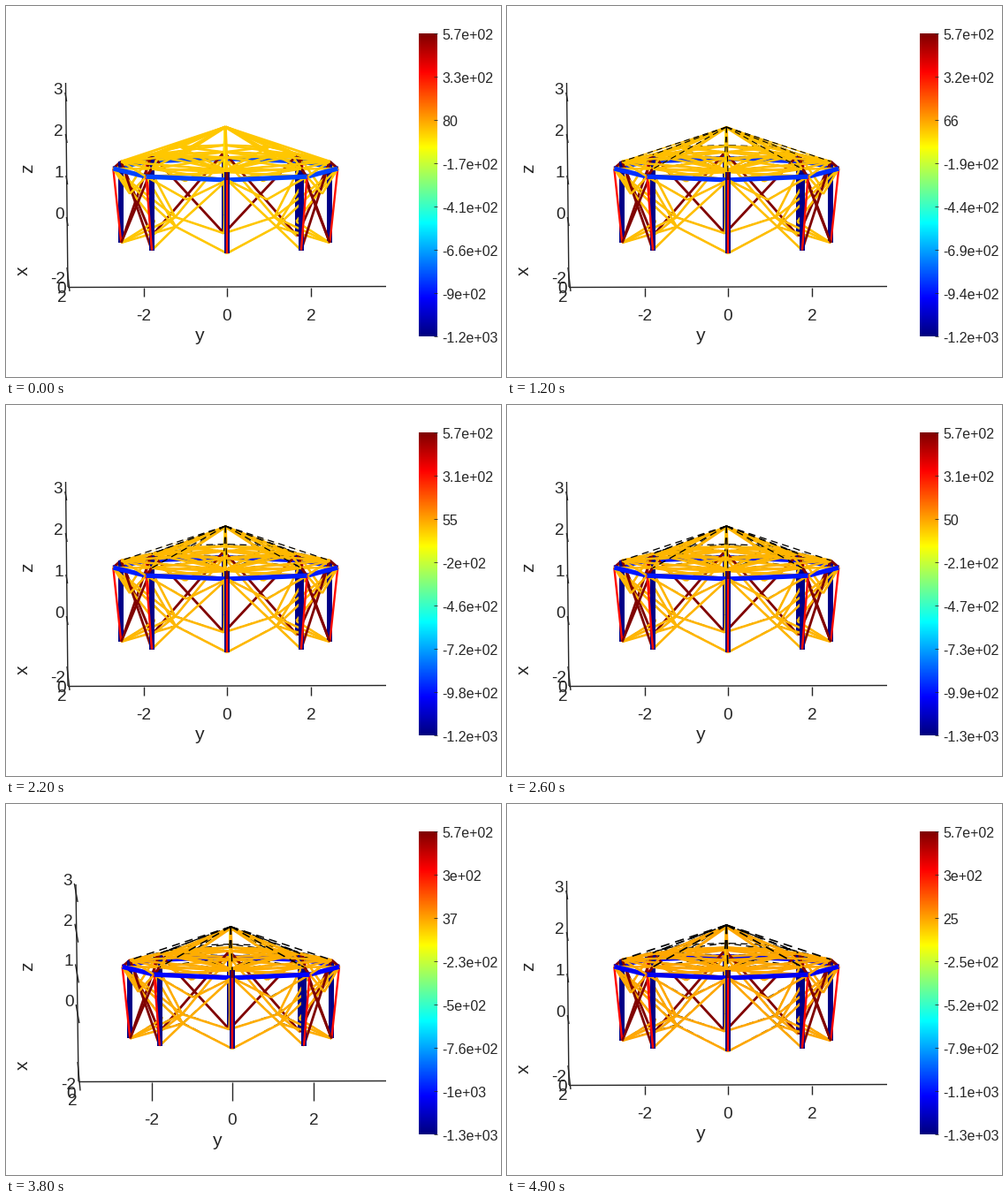
A matplotlib script that plays this animation: 560 px wide and 420 px high, repeating every 5000 ms.

```python
import numpy as np
import matplotlib.pyplot as plt
from matplotlib.animation import FuncAnimation
from matplotlib.collections import LineCollection

W, H, DPI = 560, 420, 100
FRAMES, INTERVAL = 50, 100
PX = 72 / DPI
INK = "#262626"
plt.rcParams["font.family"] = "Liberation Sans"

fig = plt.figure(figsize=(W / DPI, H / DPI), dpi=DPI, facecolor="white")
ax = fig.add_axes([0, 0, 1, 1])
ax.set_axis_off()


def jet(t):
    """Rainbow built from three shifted trapezoids."""
    t = np.clip(np.asarray(t)[..., None], 0, 1)
    return np.clip(1.5 - np.abs(4 * t - np.array([3, 2, 1])), 0, 1)


def text(x, y, label, size=19, ha="center", rotation=0):
    """Place text with the middle of its digits at pixel y."""
    if rotation:
        return ax.text(x, y, label, size=size * PX, color=INK, ha=ha,
                       va="center", rotation=rotation)
    return ax.text(x, y + 0.36 * size, label, size=size * PX, color=INK,
                   ha=ha, va="baseline")


def line(x0, y0, x1, y1, width=1.4):
    return ax.plot([x0, x1], [y0, y1], color=INK, lw=width * PX,
                   solid_capstyle="butt", zorder=1)[0]


# ---- axes, in two layouts ----
def make_axes(z_line, z_ticks, z_step, tick, y_line, y_ticks, y_text,
              x_labels, names):
    x0, top, x1, bottom = z_line
    parts = [line(*z_line), line(*y_line)]
    for k, label in enumerate("3210"):
        y = z_ticks + k * z_step
        x = x0 + (x1 - x0) * (y - top) / (bottom - top)
        parts.append(text(x - 9, y - 5, label))
        parts.append(line(x - tick * 0.08, y, x + tick * 0.1, y + tick))
    for x, label in zip(y_ticks, ("-2", "0", "2")):
        parts.append(line(x, y_line[1], x, y_line[1] + tick))
        parts.append(text(x, y_text, label))
    for (x, y), label in zip(x_labels, ("-2", "0", "2")):
        parts.append(text(x, y, label))
    parts.append(line(x1 - 1, bottom - 22, x1 + 2, bottom + tick * 0.5))
    for (x, y), label in zip(names, "xyz"):
        parts.append(text(x, y, label, 21, rotation=0 if label == "y" else 90))
    return parts


wide_axes = make_axes((67.5, 87, 70, 318), 98, 47, 10,
                      (70, 318.5, 430, 317.5), (156, 250, 345), 349,
                      ((59, 307), (62.5, 318), (63, 328)),
                      ((19, 300), (219, 371), (25, 184)))
small_axes = make_axes((79, 91, 82, 314), 90, 45.7, 21,
                       (82, 314.5, 430, 313.5), (165, 256, 348), 356,
                       ((71, 316), (74, 326), (75, 334)),
                       ((19, 296), (239, 379), (25, 184)))

# ---- colour bar ----
BAR_TOP, BAR_BOTTOM = 31, 374
ax.imshow(jet(np.linspace(1, 0, 256))[:, None], aspect="auto",
          extent=(467, 488, BAR_BOTTOM, BAR_TOP))
bar_labels = []
for k in range(8):
    y = BAR_TOP + k * (BAR_BOTTOM - BAR_TOP) / 7
    line(484, y, 488, y, 0.8).set_zorder(4)
    bar_labels.append(text(493.5, y + 1.5, "", 16, "left"))


# ---- truss: nodes are (x, y, depth, sag) in pixels ----
def node(k, radius, level, sag=0):
    angle = np.pi / 4 * k
    depth = radius * np.cos(angle)
    side = radius * np.sin(angle) * (1 + 0.00015 * depth)
    tilt = 0.102 if depth > 0 else 0.09
    return np.array([248.3 + side + 0.014 * depth,
                     level + tilt * depth, depth, sag])


def ring(radius, level, sag=0, shift=0):
    return [node(k + shift, radius, level, sag) for k in range(8)]


base = ring(118, 268)
head = ring(118, 176)
rim = ring(127, 184)
knee = ring(80, 244, 1)
panel = ring(117, 208, 1.2, 0.5)
roof = ring(72, 164, 5)
apex = node(0, 0, 137, 2)
hub = node(0, 0, 186, 1)

CABLE, SLACK, TIE, BRACE, STRUT, COLUMN, HOOP = range(7)
members = []   # (start, end, kind, width)


def add(a, b, kind=CABLE, width=2.6):
    members.append((a, b, kind, width))


add(apex, hub, STRUT, 3.5)
for k in range(8):
    n = (k + 1) % 8
    add(base[k], head[k], COLUMN, 6)
    add(rim[k], rim[n], HOOP, 5.3)
    add(rim[k], base[k], TIE, 2.4)
    add(head[k], rim[k], BRACE, 3)
    if 1 <= k <= 6:
        add(head[k], base[n], BRACE, 2.8)
        add(head[n], base[k], BRACE, 2.8)
    add(apex, head[k], SLACK, 2.8)
    add(apex, roof[k], CABLE, 3.2)
    for a, b in ((roof[k], roof[n]), (roof[k], hub), (hub, head[k]),
                 (head[k], head[n]), (head[k], roof[n]), (head[n], roof[k]),
                 (head[k], rim[n]), (head[n], rim[k]),
                 (knee[k], base[k]), (knee[k], rim[k]),
                 (panel[k], rim[k]), (panel[k], rim[n])):
        add(a, b)
    if k % 2:
        for j in (n, k - 1):
            add(knee[k], base[j])
            add(knee[k], rim[j])
members.sort(key=lambda m: m[0][2] + m[1][2] + (4 if m[2] == TIE else 0))
kinds = np.array([m[2] for m in members])
widths = np.array([m[3] for m in members])

covered = [m for m in members if m[2] == CABLE]
exposed = [m for m in members if m[2] == SLACK]


def collect(zorder, **style):
    lines = LineCollection([], zorder=zorder, **style)
    ax.add_collection(lines)
    return lines


dashes = dict(colors="black", linestyles=[(0, (6, 4))])
under_lines = collect(1.5, **dashes)
solid_lines = collect(2)
over_lines = collect(3, **dashes)
ax.set_xlim(0, W)
ax.set_ylim(H, 0)


def segments(items, load, small):
    pairs = np.array([[a, b] for a, b, *_ in items])
    points = pairs[..., :2].copy()
    points[..., 1] += pairs[..., 3] * load
    if small:
        points = (points - (248.5, 280)) * 0.966 + (254.5, 277)
    return points


def update(i):
    load = i / (FRAMES - 1)
    small = 36 <= i <= 39
    for artist in wide_axes:
        artist.set_visible(not small)
    for artist in small_axes:
        artist.set_visible(small)

    high = 571.5
    middle = np.interp(i, [0, 6, 18, 26, 34, 38, 49],
                       [79.5, 72, 60, 50, 41, 37, 25])
    step = (high - middle) / 2
    low = high - 7 * step
    for k, label in enumerate(bar_labels):
        label.set_text(f"{high - k * step:.2g}")

    force = {CABLE: 20, SLACK: 20, TIE: 322, BRACE: high, STRUT: -57,
             COLUMN: low + 15, HOOP: -820 - 310 * load}
    shade = {kind: jet((value - low) / (high - low))
             for kind, value in force.items()}
    thinning = np.where(kinds == SLACK, max(0, 1 - i / 24), 1)
    solid_lines.set_segments(segments(members, load, small))
    solid_lines.set_color([shade[kind] for kind in kinds])
    solid_lines.set_linewidths(widths * thinning * PX)

    under_lines.set_segments(segments(covered, 0, small))
    under_lines.set_linewidths(1.3 * PX)
    over_lines.set_segments(segments(exposed, 0, small))
    over_lines.set_linewidths((0.9 + 0.8 * load) * PX)
    over_lines.set_visible(i > 0)
    return solid_lines, under_lines, over_lines


animation = FuncAnimation(fig, update, frames=FRAMES, interval=INTERVAL,
                          repeat=True, repeat_delay=0, blit=False)
plt.show()
```
